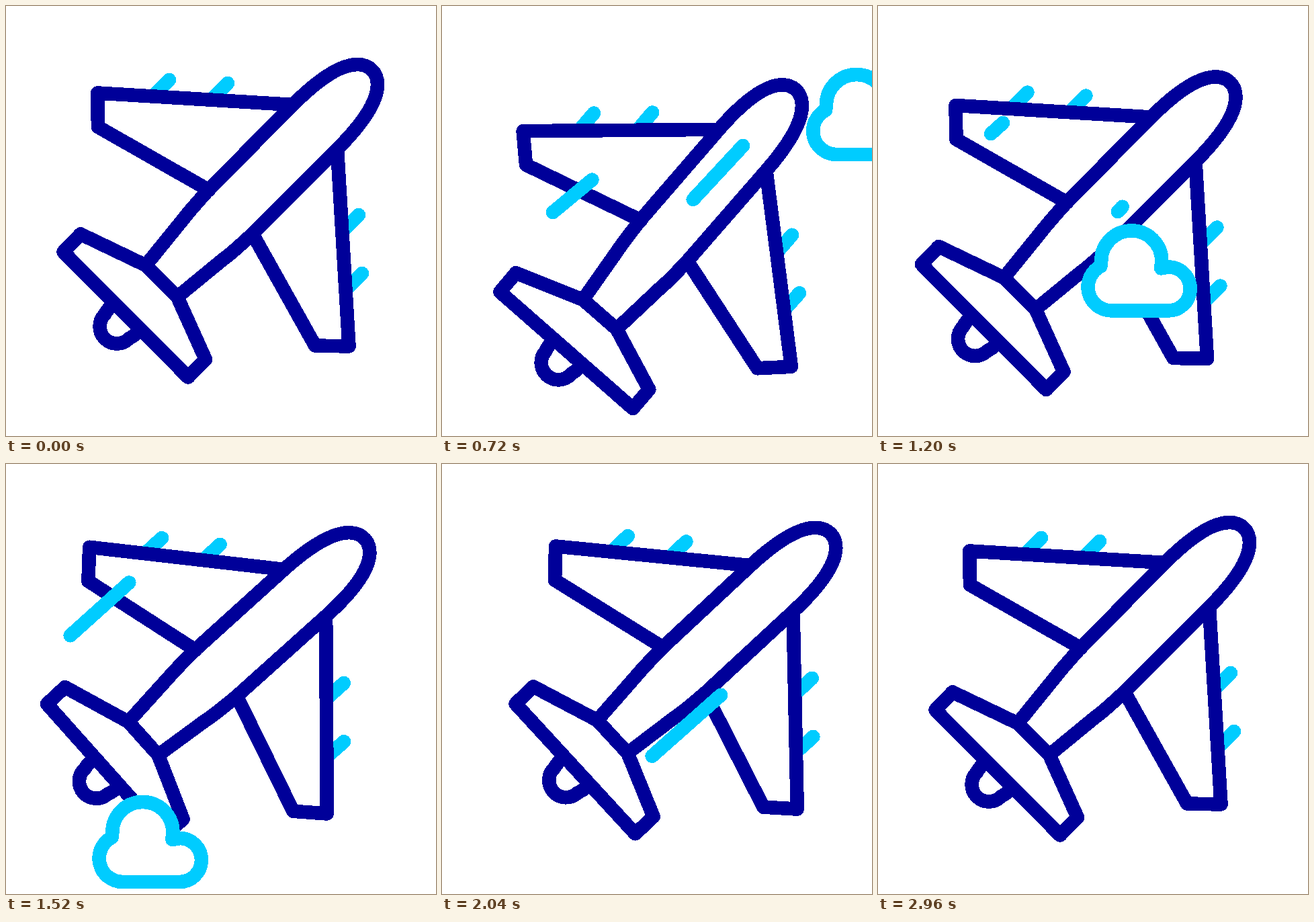
An HTML page that plays this animation: 640x640 px, repeating every 3 s.

```html
<!DOCTYPE html>
<html>
<head>
<meta charset="utf-8">
<style>
  html, body { margin: 0; width: 100%; height: 100%; overflow: hidden; background: #fff; }
  svg { display: block; width: 100vw; height: 100vh; shape-rendering: crispEdges; }
  path { fill: none; stroke: #009; stroke-width: 20.6; stroke-linecap: round; stroke-linejoin: round; }
  .sky { stroke: #0cf; }
</style>
</head>
<body>
<svg viewBox="0 0 640 640">
  <g id="plane">
    <path class="sky" d="M243 110L219 134.5M330 115L306 139.5M525 311L500.5 335.5M530 398L505.5 422"/>
    <path d="M427 147L136 129.5L137 180L302 274M493 213L510.5 506.5L460 505.5L368 341"/>
    <path d="M208 386L264 317Q274 304 302 273L427 147C463 111 497 87 523 87C541 87 553 99 553 117C553 143 529 177 493 213L367 339Q336 368 322 378L255 433"/>
    <path d="M208 386L111 339.5L85.5 366L271 552.5L297 526L255 433Z"/>
    <path d="M158 445Q152 450 147 459A25 25 0 0 0 183 495Q191 491 197 485"/>
  </g>
  <path class="sky streak" data-start="40" pathLength="1" d="M270 220L165 307"/>
  <path class="sky streak" data-start="318" pathLength="1" d="M448 208L357 306"/>
  <path class="sky streak" data-start="1040" pathLength="1" d="M186 174L91 259.5"/>
  <path class="sky streak" data-start="1600" pathLength="1" d="M415.5 343.5L300 446"/>
  <path id="cloud" class="sky" style="fill:#fff" d="M118 66L130 64A32.5 32.5 0 0 1 128 129H44A35 35 0 0 1 28 63L29 55A45 45 0 0 1 119 55Z"/>
</svg>
<script>
const LOOP = 3000, STEP = 40, TRAVEL = 560, LAG = 420;
const plane = document.getElementById('plane');
const cloud = document.getElementById('cloud');
const streaks = document.querySelectorAll('.streak');

const poses = [
  { t: 0, x: 0, y: 0, turn: 0 },
  { t: 720, x: -3, y: 43.5, turn: -3.9 },
  { t: 1200, x: -20.5, y: 18.5, turn: 0 },
  { t: 1500, x: -22.5, y: 4.4, turn: 3.1 },
  { t: 2020, x: 25.7, y: 0, turn: 2.25 },
  { t: 2760, x: 0, y: 0, turn: 0 }
];

const clamp = (v, lo, hi) => Math.max(lo, Math.min(hi, v));
const ease = u => (1 - Math.cos(Math.PI * clamp(u, 0, 1))) / 2;

// Slope at a pose: flat at turning points, else the harmonic mean of both sides
function slope(i, key) {
  const [p, q, r] = [poses[i - 1], poses[i], poses[i + 1]];
  if (!p || !r) return 0;
  const a = (q[key] - p[key]) / (q.t - p.t), b = (r[key] - q[key]) / (r.t - q.t);
  return a * b > 0 ? 2 * a * b / (a + b) : 0;
}

function glide(t, key) {
  const next = poses.findIndex(p => p.t > t);
  if (next < 0) return poses.at(-1)[key];
  const p = poses[next - 1], q = poses[next], span = q.t - p.t;
  const u = (t - p.t) / span, v = 1 - u;
  return p[key] * v * v * (1 + 2 * u) + q[key] * u * u * (3 - 2 * u)
    + span * u * v * (slope(next - 1, key) * v - slope(next, key) * u);
}

// The head runs ahead, the tail follows the same way later
function drawStreak(path, t) {
  const age = t - path.dataset.start;
  const head = ease(age / TRAVEL), tail = ease((age - LAG) / TRAVEL);
  path.style.visibility = head - tail > 0.002 ? 'visible' : 'hidden';
  path.style.strokeDasharray = `${head - tail} 2`;
  path.style.strokeDashoffset = -tail;
}

function draw(t) {
  plane.setAttribute('transform',
    `translate(${glide(t, 'x')} ${glide(t, 'y')}) rotate(${glide(t, 'turn')} 323 318)`);
  const s = Math.sin(clamp(0.00148 * (t - 1240), -Math.PI / 2, Math.PI / 2));
  cloud.setAttribute('transform', `translate(${281 - 376.5 * s} ${346 + 365 * s})`);
  streaks.forEach(path => drawStreak(path, t));
}

function tick() {
  draw(Math.floor(performance.now() % LOOP / STEP) * STEP);
  requestAnimationFrame(tick);
}
tick();
</script>
</body>
</html>
```
